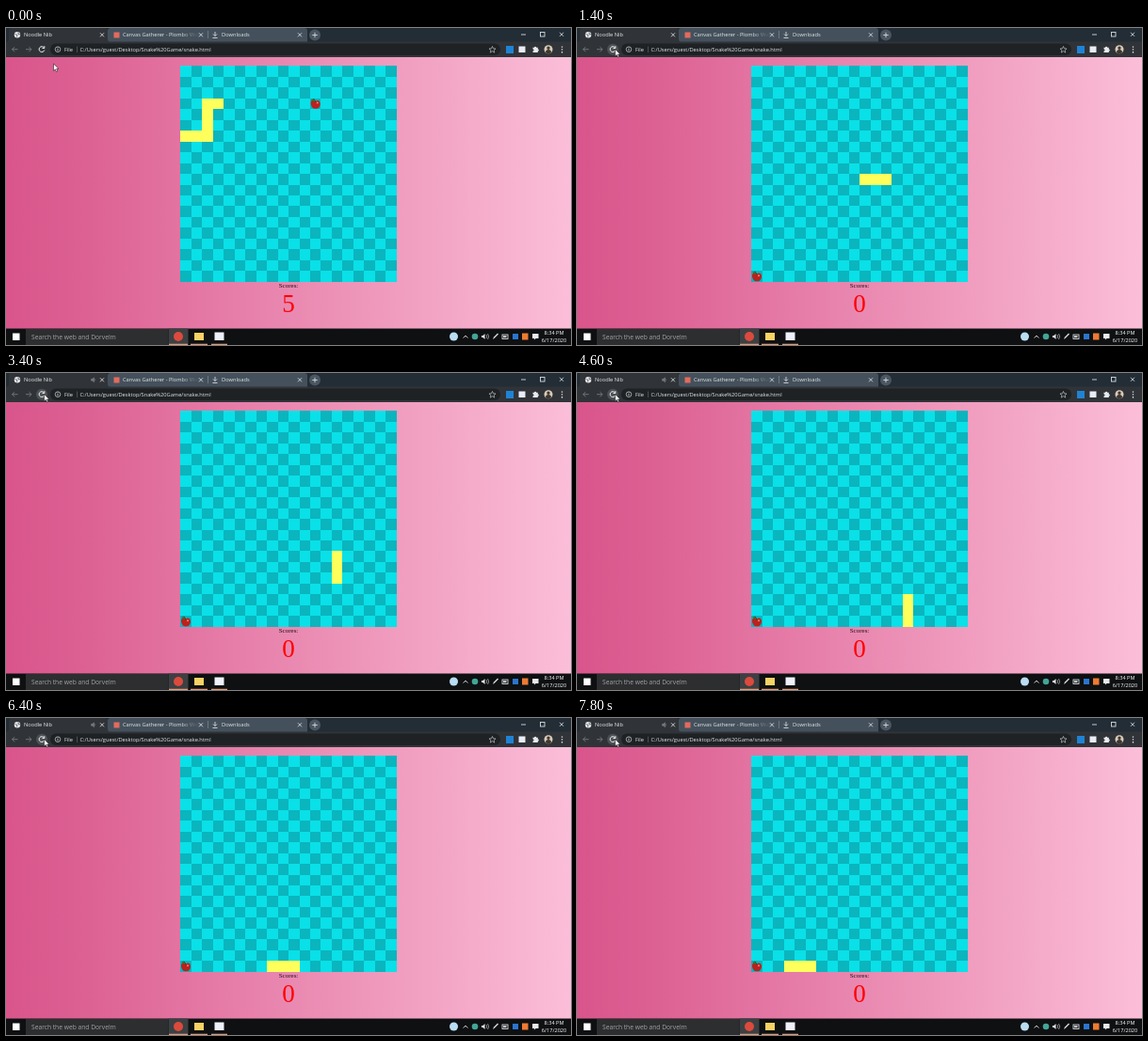
Recreate the animation shown at these times as an HTML page. Size 600 px wide and 337 px high, loop 8 s.

```html
<!DOCTYPE html>
<html lang="en">
<head>
<meta charset="utf-8">
<title>Noodle Nib</title>
<style>
  html, body { margin: 0; width: 100%; height: 100%; overflow: hidden; background: #101010; }
  svg { display: block; width: 100%; height: 100%; }
  text { font-family: "Open Sans", "Noto Sans", sans-serif; font-size: 5.7px; fill: #e4e6e8; }
  .serif { font-family: "Liberation Serif", serif; text-anchor: middle; }
  .clock { font-size: 5.6px; text-anchor: middle; fill: #fff; }
  .line { fill: none; stroke: #d6d9dc; stroke-width: .9; }
  .dim { stroke: #777b80; }
  .crisp { shape-rendering: crispEdges; }
</style>
</head>
<body>
<svg viewBox="0 0 600 337" preserveAspectRatio="none">
  <defs>
    <linearGradient id="pink">
      <stop offset="0" stop-color="#d9558b"/>
      <stop offset=".15" stop-color="#dd6294"/>
      <stop offset="1" stop-color="#fbbed8"/>
    </linearGradient>
    <linearGradient id="fade" gradientUnits="userSpaceOnUse" x1="186" x2="201">
      <stop offset="0" stop-color="#e4e6e8"/>
      <stop offset="1" stop-color="#e4e6e8" stop-opacity=".1"/>
    </linearGradient>
    <path id="close" class="line" d="M-2-2 2 2M2-2-2 2"/>
  </defs>

  <!-- page -->
  <rect y="30" width="600" height="290" fill="url(#pink)"/>
  <g id="board" class="crisp">
    <rect x="184.8" y="39.8" width="230.4" height="230.4" fill="#277f8a"/>
    <rect x="185.3" y="40.3" width="229.5" height="229.5" fill="#0ae0e7"/>
    <path id="dark" fill="#0ab5be"/>
    <path id="snake" fill="#ffff5c"/>
  </g>
  <g id="apple">
    <path d="M5.7 3.5C3-.1 0 2.800 .8 6.400 1.400 9.500 3.500 11.600 5.700 10.900 8.300 11.600 10.300 9.400 10.700 6.400 11 2.800 8 .8 5.700 3.500Z" fill="#bd201d"/>
    <path d="M5.700 4Q5 2 3.600 .4" fill="none" stroke="#4a2a17"/>
    <path d="M1 1.200Q4-.3 5.500 3 2.300 4 1 1.200Z" fill="#3a7230"/>
    <circle cx="7.700" cy="4.800" r="1" fill="#ee8a78"/>
  </g>
  <text class="serif" x="300" y="276" style="font-size:7px;fill:#241018">Scores:</text>
  <text class="serif" id="score" x="300" y="302" style="font-size:27px;fill:#f00">5</text>

  <!-- tabs -->
  <rect width="600" height="15" fill="#222d36"/>
  <path d="M108 15V3q0-3 3-3h206q3 0 3 3v12Z" fill="#44515c"/>
  <path d="M0 15Q3 15 3 11V3q0-3 3-3h99q3 0 3 3v8q0 4 3 4Z" fill="#303438"/>
  <path d="M214.500 3v8" class="line dim"/>
  <circle cx="12" cy="7.300" r="3.200" fill="#e8eaed"/>
  <path d="M9.500 6.500 12 7.500 11.500 9.500M13 4.500v2l2 .5" fill="none" stroke="#4b5055" stroke-width=".8"/>
  <text x="19" y="9.400">Noodle Nib</text>
  <path id="sound" d="M90.500 6.300h1.300l1.700-1.500v5l-1.700-1.500h-1.300ZM94.600 6v2.600" fill="#777c80" stroke="#777c80" stroke-width=".5"/>
  <use href="#close" x="102" y="7.300"/>
  <rect x="114.500" y="4.500" width="6" height="6" fill="#e26a5e"/>
  <text x="124" y="9.400" fill="url(#fade)" style="fill:url(#fade)">Canvas Gatherer - Plombo Web</text>
  <use href="#close" x="207" y="7.300"/>
  <path d="M222 4v4.500m-2-2 2 2 2-2M219.500 10.500h5" class="line"/>
  <text x="229" y="9.400">Downloads</text>
  <use href="#close" x="312" y="7.300"/>
  <circle cx="328" cy="7.500" r="6" fill="#4a5661"/>
  <path d="M325.300 7.500h5.400M328 4.800v5.400" class="line"/>
  <path d="M547 7h5" class="line"/>
  <rect x="567.500" y="4.500" width="4.500" height="4.500" class="line"/>
  <use href="#close" x="590" y="6.800"/>

  <!-- toolbar -->
  <rect y="14.500" width="600" height="16.500" fill="#303438"/>
  <rect x="47" y="16.500" width="478" height="12.500" rx="6.200" fill="#1e2225"/>
  <path d="M12.500 22.700h-6m2.600-2.600-2.600 2.600 2.600 2.600" class="line dim"/>
  <path d="M21 22.700h6m-2.600-2.600 2.600 2.600-2.600 2.600" class="line dim"/>
  <circle id="hover" cx="38" cy="22.700" r="6" fill="#4c5155"/>
  <path d="M40.300 20.800A2.900 2.900 0 1 0 40.800 23.500M40.800 19.200v2.300h-2.300" class="line" style="stroke:#fff"/>
  <circle cx="55" cy="22.700" r="2.800" class="line" style="stroke-width:.7"/>
  <path d="M55 22.200v2M55 20.700v.7" class="line"/>
  <text x="62" y="24.900">File</text>
  <path d="M75.500 19.500v6.500" class="line dim" style="stroke-width:.5"/>
  <text x="78.500" y="24.900">C:/Users/guest/Desktop/Snake%20Game/snake.html</text>
  <path d="m516.500 19.500 1 2.300 2.500.2-1.900 1.600.6 2.500-2.200-1.400-2.200 1.400.6-2.500-1.900-1.600 2.500-.2Z" class="line" style="stroke-width:.6"/>
  <rect x="531" y="19" width="8" height="8" fill="#1f83d5"/>
  <rect x="544.500" y="19.500" width="7" height="6.500" fill="#e9edf7"/>
  <path d="M559.500 20.800h1.500a1.100 1.100 0 0 1 2.200 0h1.600v1.700a1.100 1.100 0 0 1 0 2.200v1.400h-5.300v-1.600a1 1 0 0 0 0-2Z" fill="#e8eaed"/>
  <circle cx="576" cy="22.700" r="4.500" fill="#d9cdbc"/>
  <path d="M573 26a3 3 0 0 1 6 0 4.500 4.500 0 0 1-6 0ZM574.300 21.300a1.700 1.700 0 1 1 3.400 0 1.700 1.700 0 0 1-3.400 0Z" fill="#40362f"/>
  <path d="M590.500 19.500v7" stroke="#e8eaed" stroke-width="1.300" stroke-dasharray="1.300 1.500"/>

  <!-- taskbar -->
  <rect y="319.500" width="600" height="17.500" fill="#0e1012"/>
  <rect x="7" y="324.500" width="7.500" height="7.500" fill="#fff"/>
  <rect x="21" y="320" width="151" height="17" fill="#2c2e30"/>
  <text x="27" y="330.800" style="font-size:6.700px;fill:#a2a4a6">Search the web and Dorvelm</text>
  <rect x="172.500" y="319.500" width="21" height="17.500" fill="#3d4042"/>
  <path d="M173 336.300h20M196 336.300h18M218 336.300h17" stroke="#e39a78" stroke-width="1.200"/>
  <circle cx="183" cy="328" r="5" fill="#dc4a3d"/>
  <rect x="200" y="324" width="10" height="8" fill="#f7d264"/>
  <rect x="221.500" y="323.500" width="10" height="8.500" fill="#eef1fa"/>
  <circle cx="475.500" cy="328" r="4.500" fill="#b9ddf2"/>
  <path d="m485.500 329.500 2.500-2.500 2.500 2.500" class="line"/>
  <circle cx="498" cy="328" r="3.300" fill="#42a596"/>
  <path d="M505 327h1.500l2-2v6l-2-2H505Z" fill="#e8eaed"/>
  <path d="M510 326q1.500 2 0 4M511.500 325q2.500 3 0 6" class="line" style="stroke-width:.6"/>
  <path d="m517 331 1-2.500 4-4 1 1-4 4Z" fill="#d8dadc"/>
  <rect x="527" y="326" width="6" height="4.500" class="line"/>
  <path d="M528 328.200h3.500" class="line" style="stroke-width:2"/>
  <rect x="538" y="325" width="6" height="6" fill="#2b75cf"/>
  <rect x="548" y="324.500" width="6.500" height="7" fill="#ef7b32"/>
  <path d="M559 325h6.500v5h-3l-1.500 1.500V330h-2Z" fill="#e8eaed"/>
  <text class="clock" x="582" y="326.300">8:34 PM</text>
  <text class="clock" x="582" y="333.700">6/17/2020</text>

  <path id="cursor" d="M0 0v7.500l1.800-1.600 1.200 2.700 1.300-.6-1.200-2.600h2.400Z" fill="#fff" stroke="#222" stroke-width=".6"/>
</svg>
<script>
const LOOP = 8000, FRAME = 200, RELOAD = 800, SOUND_ON = 2400;
const CELL = 11.475, LEFT = 185.3, TOP = 40.3, SIZE = 20;
const $ = id => document.getElementById(id);

const square = ([col, row]) =>
  `M${LEFT + col * CELL} ${TOP + row * CELL}h${CELL}v${CELL}h${-CELL}Z`;
const squares = cells => cells.map(square).join("");
const place = (id, x, y) => $(id).setAttribute("transform", `translate(${x} ${y})`);
const show = (id, on) => $(id).setAttribute("visibility", on ? "visible" : "hidden");

const darkCells = [];
for (let row = 0; row < SIZE; row++)
  for (let col = 1 - row % 2; col < SIZE; col += 2) darkCells.push([col, row]);
$("dark").setAttribute("d", squares(darkCells));

const lastGame = [[0, 6], [1, 6], [2, 6], [2, 5], [2, 4], [2, 3], [3, 3]];

// Route of the new game: right along row 10, down column 14, left along the bottom.
function route(step) {
  if (step <= 6) return [8 + step, 10];
  if (step <= 15) return [14, 4 + step];
  return [29 - step, 19];
}

// One move every 300 ms, seen at 200 ms intervals.
function headStep(time) {
  const tick = Math.floor((time - 1000) / FRAME);
  return 3 + Math.floor((2 * tick + 1) / 3);
}

function cursorAt(time) {
  if (time < 200) return [50.5, 38];
  if (time < 400) return [45, 30];
  return [40.5, 22.5];
}

function draw(time) {
  const fresh = time >= RELOAD;
  const head = headStep(time);
  const body = fresh ? [head - 2, head - 1, head].map(route) : lastGame;
  const [appleCol, appleRow] = fresh ? [0, 19] : [12, 3];
  $("snake").setAttribute("d", squares(body));
  place("apple", LEFT + appleCol * CELL, TOP + appleRow * CELL);
  place("cursor", ...cursorAt(time));
  $("score").textContent = fresh ? 0 : 5;
  show("hover", time >= 400);
  show("sound", time >= SOUND_ON);
}

function play() {
  draw(performance.now() % LOOP);
  requestAnimationFrame(play);
}
play();
</script>
</body>
</html>
```
